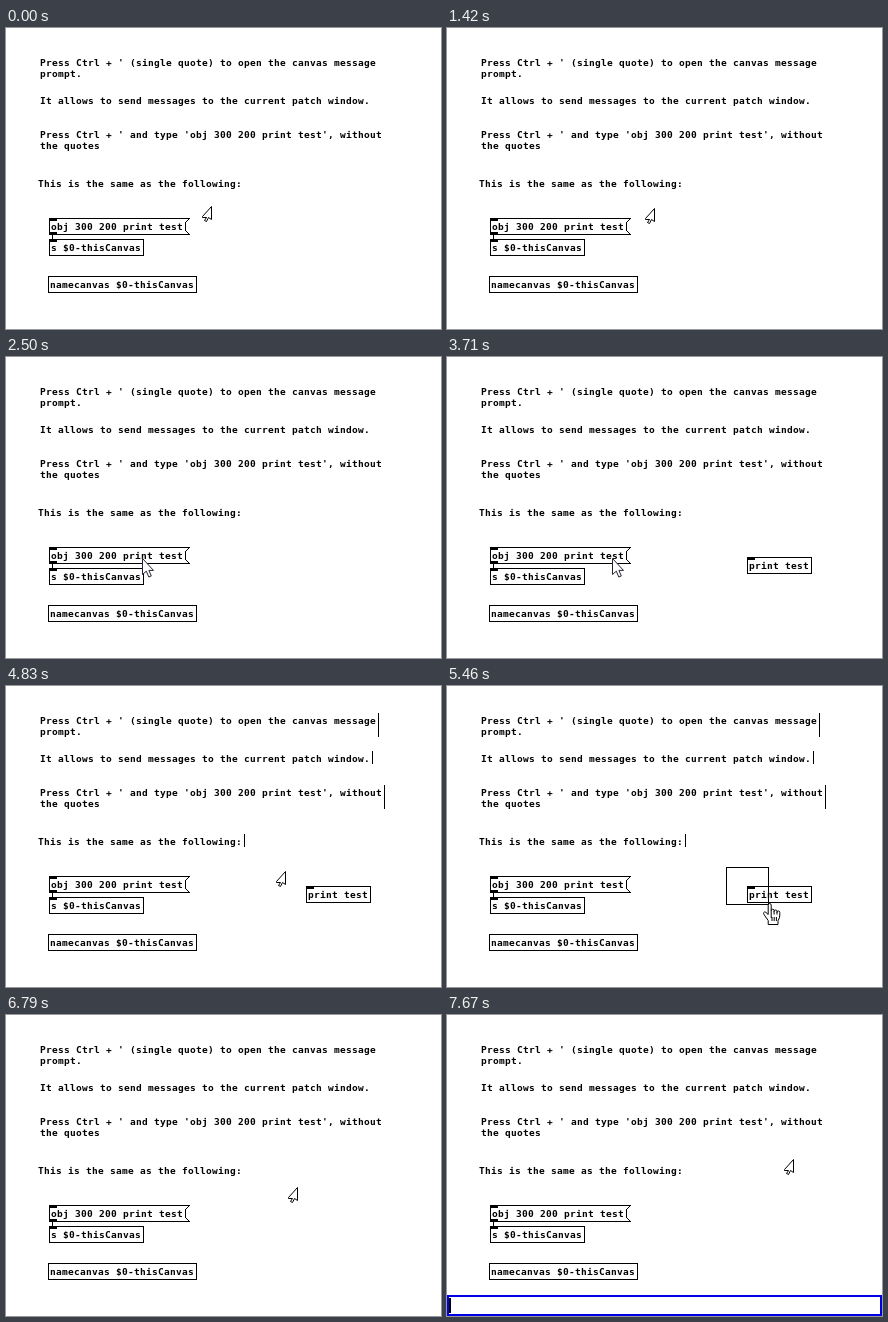
An HTML page that plays this animation: 435x301 px, repeating every 8 s.

```html
<!DOCTYPE html>
<html lang="en">
<head>
<meta charset="utf-8">
<title>Canvas message prompt</title>
<style>
html, body { margin: 0; width: 100%; height: 100%; overflow: hidden; background: #fff; }
svg { display: block; width: 100%; height: 100%; }
text { font: bold 9.5px "DejaVu Sans Mono", monospace; letter-spacing: 0.28px; white-space: pre; }
.line { fill: none; stroke: #000; shape-rendering: crispEdges; }
.solid { shape-rendering: crispEdges; }
.cursor { fill: #fff; stroke: #000; stroke-linejoin: round; }
</style>
</head>
<body>
<svg viewBox="0 0 435 301" xmlns="http://www.w3.org/2000/svg">
  <g id="notes"></g>
  <path id="message" class="line" d="M43.5 190.5H183.5L179.5 194.5V202.5L183.5 206.5H43.5Z"/>
  <g id="objects"></g>
  <path class="line" d="M46.5 207V211"/>
  <g id="print"></g>
  <path id="marks" class="line" d="M372.5 27V51M366.5 65V78M378.5 99V123M238.5 148V161"/>
  <rect id="band" class="line"/>
  <g id="prompt" class="solid">
    <rect x="1" y="281" width="433" height="19" fill="#fff" stroke="#0000e6" stroke-width="2"/>
    <path d="M2 283h2v15h-2z"/>
  </g>
  <g id="cursor" class="cursor">
    <path id="idle" d="M-.5 .5L-9.5 10.5V11.5H-5.5L-7.5 14.5L-5.5 15.5L-3.5 11.5L-.5 13.5Z"/>
    <path id="arrow" stroke="#223" d="M.5 .5V16.5L4.3 13.2L6.8 19L9.3 18L6.9 12.4H11.5Z"/>
    <g id="hand">
      <path d="M3.2 14V1.2Q3.2-.5 1.7-.5T.2 1.2V10.5L-2.2 8.3Q-3.6 7.4-4.3 8.6Q-4.7 9.5-3.8 10.8L.2 16.5V20.5H10V16.8Q11.8 14 11.8 11V8.4Q11.8 7 10.4 7T9 8.4V7.4Q9 6 7.6 6T6.1 7.4V6.6Q6.1 5.2 4.7 5.2T3.2 6.6"/>
      <path fill="none" d="M6.1 7V10.5M9 8V10.5M4 13V17M6.2 13V17M8.4 13V17"/>
    </g>
  </g>
</svg>
<script>
const LOOP = 8000;
const el = id => document.getElementById(id);
const label = (x, y, s) => `<text x="${x}" y="${y}">${s}</text>`;
const port = (x, y) => `<rect class="solid" x="${x}" y="${y}" width="8" height="3"/>`;
const frame = (x, y, w) =>
  `<rect class="line" x="${x + .5}" y="${y + .5}" width="${w - 1}" height="16"/>`;
const box = (x, y, w, s) => frame(x, y, w) + label(x + 2, y + 12, s);

el("notes").innerHTML =
  label(34, 38, "Press Ctrl + ' (single quote) to open the canvas message") +
  label(34, 49, "prompt.") +
  label(34, 76, "It allows to send messages to the current patch window.") +
  label(34, 110, "Press Ctrl + ' and type 'obj 300 200 print test', without") +
  label(34, 121, "the quotes") +
  label(32, 159, "This is the same as the following:");
el("objects").innerHTML =
  label(45, 202, "obj 300 200 print test") + port(43, 190) + port(43, 204) +
  box(43, 211, 95, "s $0-thisCanvas") + port(43, 211) +
  box(42, 248, 149, "namecanvas $0-thisCanvas");
el("print").innerHTML = box(300, 200, 65, "print test") + port(300, 200);
const printFrame = el("print").querySelector("rect");
const printText = el("print").querySelector("text");

const linear = u => u;
const out = u => u * (2 - u);
const smooth = u => u * u * (3 - 2 * u);

// Pointer path: tick (1/24 s), x, y, easing towards this point
const path = [
  [0, 206, 178], [2, 206, 178], [3, 207, 179], [33, 207, 179], [34, 208, 180],
  [45, 169, 204, smooth], [53, 144, 205, linear], [60, 136, 201, out],
  [88, 136, 201], [89, 165, 201], [107, 280, 185, out], [117, 280, 185],
  [118, 280, 184], [120, 279, 181], [123, 279, 181], [136, 342, 236, smooth],
  [145, 342, 236], [163, 292, 172, smooth], [170, 347, 144, out]
];

function pointer(k) {
  const i = path.findIndex(p => p[0] > k);
  if (i < 0) return path[path.length - 1].slice(1, 3);
  const [t0, x0, y0] = path[i - 1], [t1, x1, y1, ease = linear] = path[i];
  const u = ease((k - t0) / (t1 - t0));
  return [Math.round(x0 + (x1 - x0) * u), Math.round(y0 + (y1 - y0) * u)];
}

const show = (id, on) => el(id).setAttribute("display", on ? "inline" : "none");

function draw(ms) {
  // The screen updates 24 times a second, on 10 ms marks
  const k = Math.floor(Math.floor(ms / 10) * .24 + .1);
  const within = (a, b) => k >= a && k < b;
  const [x, y] = pointer(k);
  const hand = within(118, 154);
  const over = x >= 43 && x <= 184 && y >= 190 && y <= 206;

  el("cursor").setAttribute("transform", `translate(${x} ${y})`);
  show("hand", hand);
  show("arrow", !hand && over);
  show("idle", !hand && !over);

  el("message").setAttribute("stroke-width", within(75, 78) ? 5 : 1);
  show("print", within(75, 144));
  const ink = within(138, 144) ? "#00f" : "#000";
  printFrame.style.stroke = ink;
  printText.style.fill = ink;

  show("marks", within(116, 154));
  show("band", within(124, 138));
  const band = { x: 279.5, y: 181.5, width: Math.max(0, x - 279), height: Math.max(0, y - 181) };
  for (const a in band) el("band").setAttribute(a, band[a]);
  show("prompt", k >= 184);
}

const start = performance.now();
function tick() {
  draw((performance.now() - start) % LOOP);
  requestAnimationFrame(tick);
}
draw(0);
requestAnimationFrame(tick);
</script>
</body>
</html>
```
